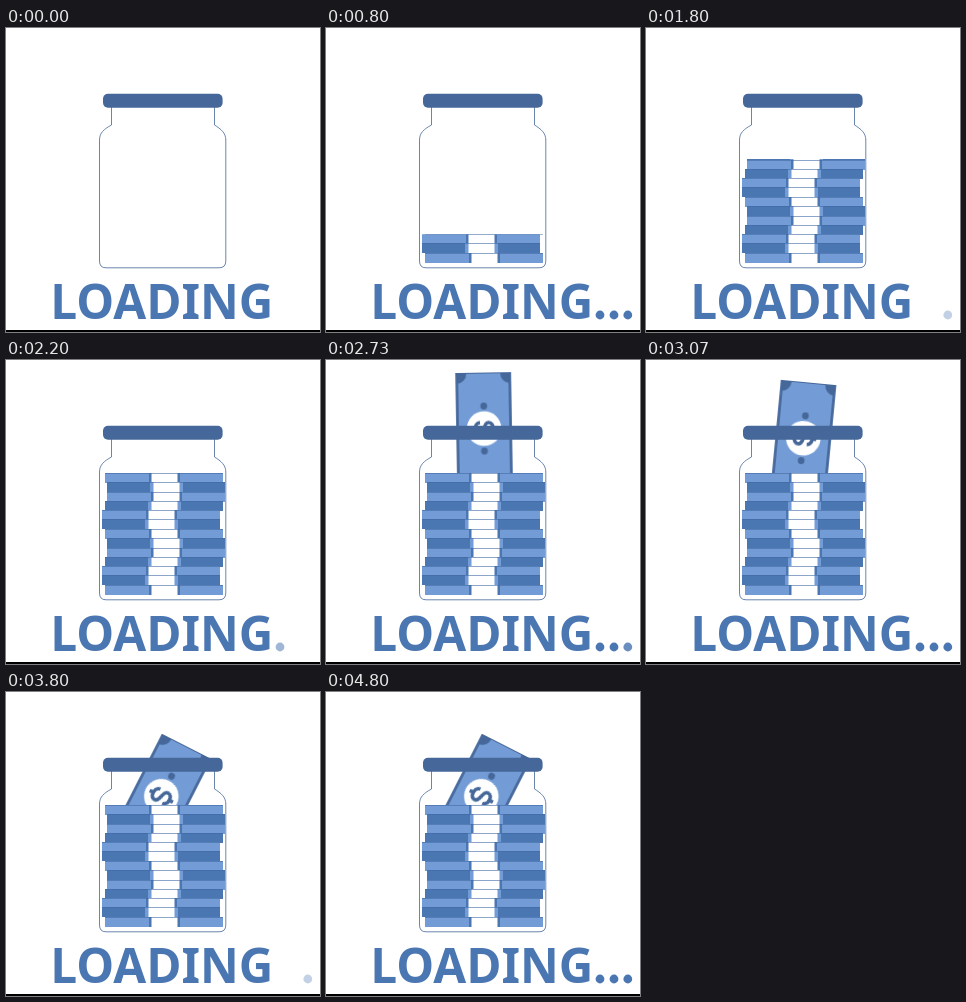
These frames come from a looping animation (314x304 px, 5190 ms). An HTML page without scripts:

```html
<!DOCTYPE html>
<html lang="en">
<head>
<meta charset="utf-8">
<title>Loading</title>
<style>
  html, body { margin: 0; width: 100%; height: 100%; overflow: hidden; background: #fff; }
  svg { display: block; width: 314px; height: 304px; }
  text { font-family: "Noto Sans", "Open Sans", sans-serif; font-weight: 700; }
  .dark { fill: #4a76b2; }
  .light { fill: #739cd6; }
  .ink { fill: #456799; }
  .line { fill: none; stroke: #456799; }
  .dot, #reveal, #note { animation: 5.19s linear infinite; }

  #reveal { animation-name: reveal; }
  @keyframes reveal {
    0%, 4.82% { transform: none; animation-timing-function: steps(13, end); }
    39.88%, 100% { transform: translateY(-123px); }
  }

  #note { animation-name: drop; }
  @keyframes drop {
    0%, 49.5% { opacity: 0; transform: translate(158.5px, 64px) rotate(-4deg); }
    49.51% { opacity: 1; transform: translate(158.5px, 64px) rotate(-4deg); }
    59.15% { opacity: 1; transform: translate(157.3px, 78.2px) rotate(5.4deg); }
    69.36%, 100% { opacity: 1; transform: translate(155.3px, 104.3px) rotate(27deg); }
  }

  .d1 { animation-name: d1; }
  .d2 { animation-name: d2; }
  .d3 { animation-name: d3; }
  @keyframes d1 {
    0%, 27.9%, 38.5%, 66.5%, 77.1% { opacity: 0; }
    7.4%, 20.8%, 45.9%, 59.3%, 84.5%, 100% { opacity: 1; }
  }
  @keyframes d2 {
    0%, 3.9%, 33.1%, 42.4%, 71.7%, 80.9% { opacity: 0; }
    11.2%, 25.4%, 49.7%, 64%, 88.3%, 100% { opacity: 1; }
  }
  @keyframes d3 {
    0%, 8.1%, 37.3%, 46.6%, 75.8%, 85.2% { opacity: 0; }
    15.4%, 29.6%, 53.9%, 68.1%, 92.4%, 100% { opacity: 1; }
  }
</style>
</head>
<body>
<svg viewBox="0 0 314 304">
  <defs>
    <clipPath id="filled"><rect id="reveal" x="90" y="235" width="134" height="130"/></clipPath>
    <g id="band">
      <path d="M46.5 0h26v10h-26z" fill="#fff"/>
      <path d="M0 .5H118" stroke="#416aa6" stroke-opacity=".6"/>
    </g>
    <g id="lt">
      <path class="light" d="M0 0h118v10h-118z"/>
      <path class="dark" d="M44 0h31v10h-31z"/>
      <use href="#band"/>
    </g>
    <g id="dk">
      <path class="dark" d="M0 0h118v10h-118z"/>
      <path class="light" d="M43 0h33v10h-33z"/>
      <use href="#band"/>
    </g>
    <path id="corner" class="ink" d="M-27-55h10a10 10 0 0 1-10 10z"/>
  </defs>

  <rect width="314" height="304" fill="#fff"/>

  <g id="note">
    <rect class="light" x="-27.5" y="-56" width="55" height="112"/>
    <use href="#corner"/>
    <use href="#corner" transform="scale(-1 1)"/>
    <use href="#corner" transform="scale(1 -1)"/>
    <use href="#corner" transform="scale(-1)"/>
    <path class="line" d="M-26.5-56V56M26.5-56V56" stroke-width="2.6"/>
    <path class="line" d="M-27.5-55.5h55M-27.5 55.5h55" stroke-width="1.2"/>
    <circle class="ink" cy="-22.5" r="3.4"/>
    <circle class="ink" cy="22.5" r="3.4"/>
    <circle r="17.3" fill="#fff"/>
    <path class="line" transform="rotate(90)" stroke-width="3.6" d="M6-4C5.5-10.5-6-10.5-6-4.5C-6 1.5 6-1.5 6 4.5C6 10.5-5.5 10.5-6 4M0-8V-13M0 8V13"/>
  </g>

  <g clip-path="url(#filled)">
    <use href="#lt" x="99" y="113"/>
    <use href="#dk" x="101" y="122"/>
    <use href="#lt" x="101" y="132"/>
    <use href="#dk" x="99" y="141"/>
    <use href="#lt" x="96" y="150"/>
    <use href="#dk" x="96" y="159"/>
    <use href="#lt" x="99" y="169"/>
    <use href="#dk" x="101" y="178"/>
    <use href="#lt" x="101" y="188"/>
    <use href="#dk" x="99" y="197"/>
    <use href="#lt" x="96" y="206"/>
    <use href="#dk" x="96" y="215"/>
    <use href="#lt" x="99" y="225"/>
  </g>

  <path class="line" d="M105.5 79V97C98 101 93.5 105 93.5 112V233Q93.5 239.8 100 239.8H213Q219.8 239.8 219.8 233V112C219.8 105 215 101 208.5 97V79" stroke-width=".8"/>
  <rect class="ink" x="97" y="65.7" width="119.6" height="14" rx="5"/>

  <text class="dark" x="44.3" y="291" font-size="47.7">LOADING</text>
  <g class="dark">
    <circle class="dot d1" cx="274" cy="287" r="4.4"/>
    <circle class="dot d2" cx="288" cy="287" r="4.4"/>
    <circle class="dot d3" cx="301.8" cy="287" r="4.4"/>
  </g>
  <rect y="302" width="314" height="2"/>
</svg>
</body>
</html>
```
